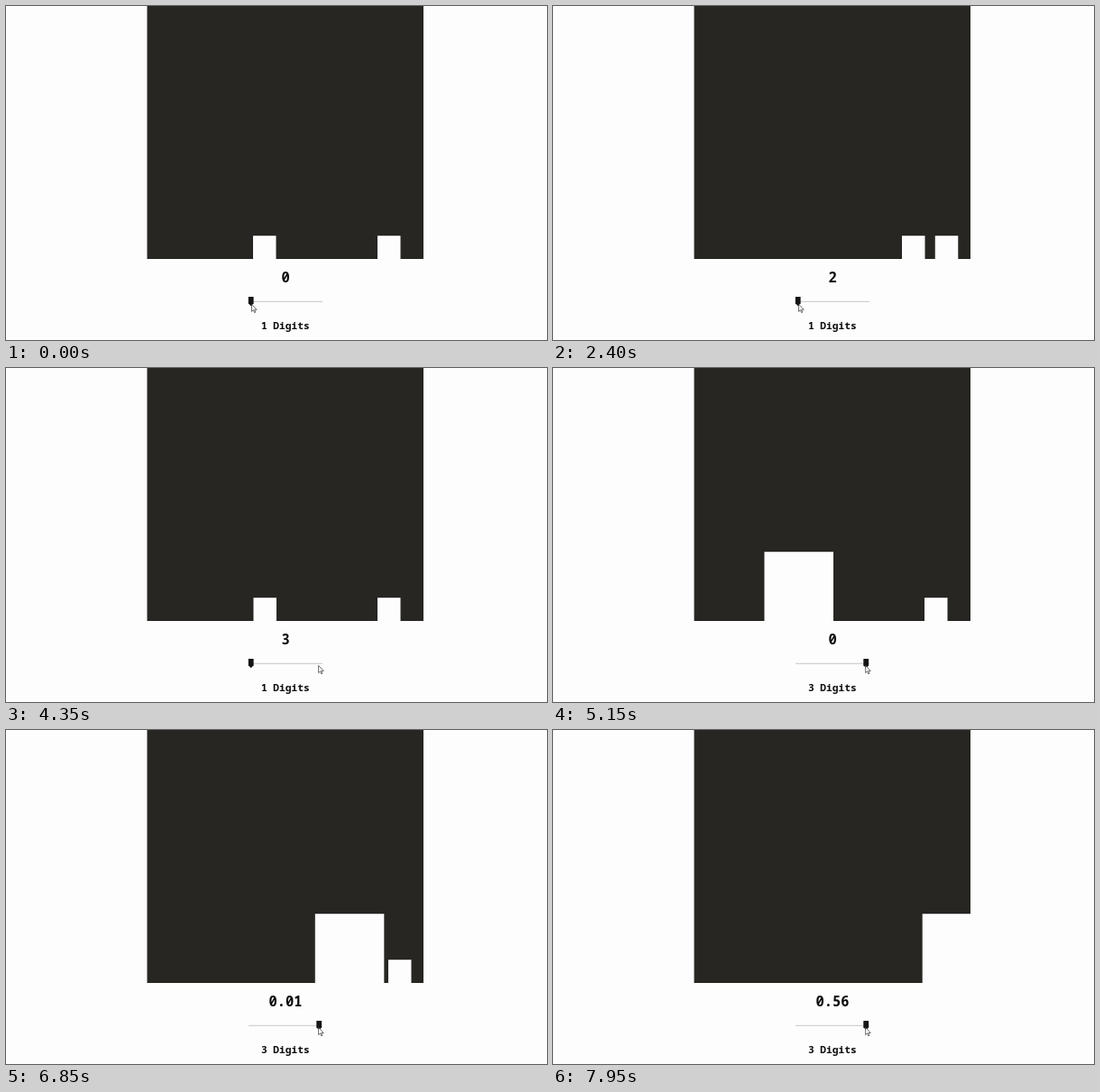
Recreate the animation shown at these times as an HTML page. Size 600x371 px, loop 8000 ms.

```html
<!DOCTYPE html>
<html lang="en">
<head>
<meta charset="utf-8">
<title>Colliding blocks</title>
<style>
  html, body { margin: 0; width: 100%; height: 100%; overflow: hidden; background: #fefdfe; }
  svg { display: block; width: 600px; height: 371px; }
  text { font-family: "Noto Sans Mono", monospace; font-weight: 700; text-anchor: middle; fill: #0a0a0a; }
  .block { fill: #fefdfe; }
</style>
</head>
<body>
<svg viewBox="0 0 600 371">
  <rect x="156.5" width="306.5" height="281" fill="#272622"/>
  <rect id="big" class="block"/>
  <rect id="small" class="block" y="255.2" width="25.5" height="26.8"/>
  <text id="count" x="310" y="307" font-size="15.4"></text>
  <path d="M269 328.3H351" stroke="#c6c5cb"/>
  <path id="thumb" d="M0 .4Q0 0 .4 0H5.4Q5.8 0 5.8 .4V7.2L2.9 10.2L0 7.2Z"/>
  <text id="label" x="309.8" y="359" font-size="11.2"></text>
  <path id="cursor" d="M0 0V8.2L1.9 6.5L3.1 9.4L4.3 8.9L3.1 6.1H5.6Z"
        fill="#fff" stroke="#333" stroke-width=".7"/>
</svg>
<script>
const LOOP = 8000, STEP = 50, RESET = 4740, RAPID = 7077;
const UNIT = 25.5, FLOOR = 281, SPEED = 0.06375;
const RAPID_GAP = 17.29;   // ms between collisions once they come in quick succession
const ANGLE = 0.01;        // phase turned per collision at mass ratio 10000

const firstHits = [1772, 2180, 2585];
const secondHits = [6756, 6956, 7017, 7047, 7065, RAPID];

const bigPath = [[0, 274], [1772, 387], [2585, 387], [RESET, 249.6]];
const smallPath = [
  [0, 412], [1772, 412], [2180, 437.8], [2585, 412],
  [6756, 412], [6956, 437.5], [7017, 429.7], [7047, 437.4], [7065, 432.8], [RAPID, 437.5]
];
const cursorX = [[2850, 272.5], [3300, 332.3], [3500, 332.3], [3800, 346.6]];
const cursorY = [[2850, 331.2], [3050, 334], [3300, 328.4], [3500, 328.4], [3800, 330.4]];

const $ = id => document.getElementById(id);
const [big, small, count, thumb, label, cursor] =
  ["big", "small", "count", "thumb", "label", "cursor"].map($);

function along(points, t) {
  const next = points.findIndex(p => p[0] > t);
  if (next === 0) return points[0][1];
  if (next < 0) return points[points.length - 1][1];
  const [t0, a] = points[next - 1], [t1, b] = points[next];
  return a + (b - a) * (t - t0) / (t1 - t0);
}

const rapidHits = t => 6 + (t - RAPID) / RAPID_GAP;

function bigLeft(t) {
  if (t < RESET) return along(bigPath, t);
  const left = 208.3 + SPEED * (Math.min(t, RAPID) - RESET);
  if (t < RAPID) return left;
  // The heavy block slows down as the cosine of the accumulated phase.
  const swing = Math.sin(ANGLE * rapidHits(t)) - Math.sin(ANGLE * 6);
  return left + SPEED * RAPID_GAP / ANGLE * swing;
}

function collisions(t) {
  if (t >= RAPID) return Math.floor(rapidHits(t));
  return (t < RESET ? firstHits : secondHits).filter(hit => hit <= t).length;
}

function draw(t) {
  const heavy = t >= RESET;
  const size = heavy ? 3 * UNIT : UNIT;
  const left = bigLeft(t);
  big.setAttribute("x", left);
  big.setAttribute("y", FLOOR - size - 0.3);
  big.setAttribute("width", size);
  big.setAttribute("height", size + 1.3);
  small.setAttribute("x", along(smallPath, t));

  count.textContent = collisions(t) / (heavy ? 100 : 1);
  label.textContent = (heavy ? 3 : 1) + " Digits";

  const idle = t >= 2900 && t < 3700;
  thumb.setAttribute("fill", idle ? "#0b74d8" : "#151515");
  thumb.setAttribute("transform", `translate(${heavy ? 344.3 : 268.8} 323)`);
  cursor.setAttribute("transform", `translate(${along(cursorX, t)} ${along(cursorY, t)})`);
}

const start = performance.now();
function tick() {
  const t = (performance.now() - start) % LOOP;
  draw(Math.floor(t / STEP) * STEP);
  requestAnimationFrame(tick);
}
tick();
</script>
</body>
</html>
```
